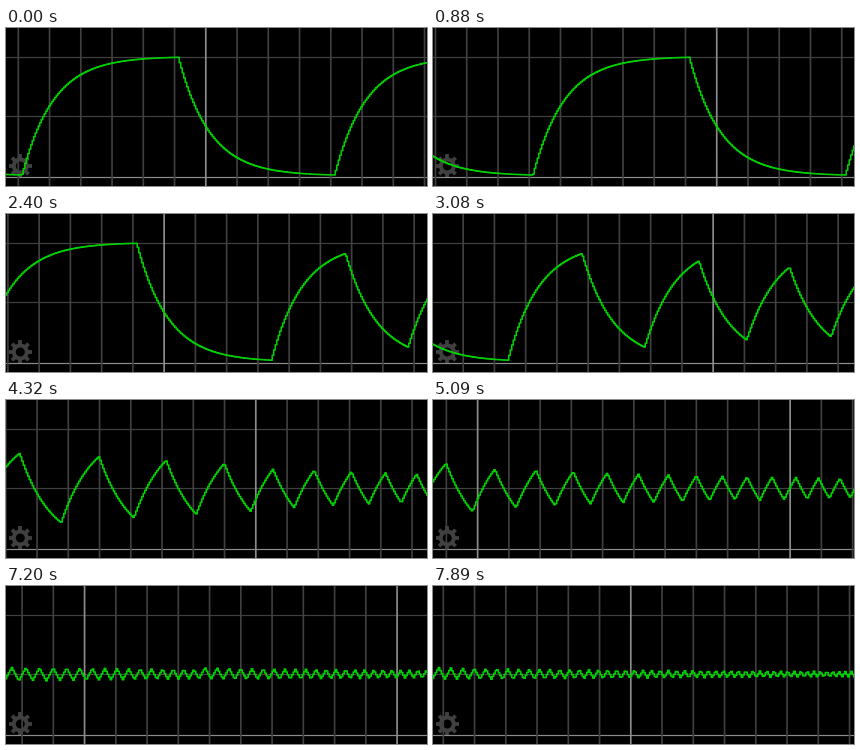
These frames come from a looping animation (421 px wide and 158 px high, 7950 ms). A matplotlib script:

```python
import numpy as np
import matplotlib.pyplot as plt
from matplotlib.animation import FuncAnimation
from matplotlib.collections import LineCollection

W, H, DPI = 421, 158, 100
PX = 72 / DPI                      # one pixel in points
LOOP, TICK = 7950, 15              # ms
STEP, STEPS = 68.4, 116            # the scope refreshes every STEP ms

DIV = 31.25                        # grid division, also the RC time constant
V_HIGH, V_LOW = 28.0, 147.3        # screen rows of the two input levels
DIM, BRIGHT, GREEN = "#404040", "#8c8c8c", "#00d000"


def scroll(step):
    """Near-constant speed with a slight lag past the middle."""
    return np.interp(step, [0, 63, 86, 115], [0.7, 1200.7, 1629.7, 2190.2])


def input_edges():
    """Flips of the square wave: steady at first, then a logarithmic sweep."""
    steady = 17 + 5 * DIV * np.arange(-1, 6)
    key_n = np.array([0, 5, 12, 21, 29, 41, 63, 90, 200])
    key_x = [933, 1214.5, 1445.5, 1611.5, 1720, 1853, 2030.5, 2190, 2641]
    n = np.arange(key_n[-1] + 1)
    sweep = np.interp(np.log(n + 5), np.log(key_n + 5), key_x)
    return np.concatenate([steady, sweep])


def edge_levels(edges):
    """Capacitor level (0..1) at every flip; odd flips go high."""
    levels = [1.0]
    for i, gap in enumerate(np.diff(edges)):
        goal = i % 2
        levels.append(goal + (levels[-1] - goal) * np.exp(-gap / DIV))
    return np.array(levels)


EDGES = input_edges()
LEVELS = edge_levels(EDGES)


def trace_y(x):
    i = np.searchsorted(EDGES, x, side="right") - 1
    goal = i % 2
    level = goal + (LEVELS[i] - goal) * np.exp(-(x - EDGES[i]) / DIV)
    return V_LOW + (V_HIGH - V_LOW) * level


def vertical(xs):
    return [[(x, 0), (x, H)] for x in xs]


def grid_lines(color, z):
    lines = LineCollection([], colors=color, linewidths=1.7 * PX,
                           snap=False, zorder=z)
    return ax.add_collection(lines)


fig = plt.figure(figsize=(W / DPI, H / DPI), dpi=DPI, facecolor="black")
ax = fig.add_axes([0, 0, 1, 1])
ax.set_xlim(0, W)
ax.set_ylim(H, 0)
ax.axis("off")

# Settings wheel
gx, gy = 14.3, 138
ax.add_patch(plt.Circle((gx, gy), 6.5, fill=False, ec=DIM, lw=4 * PX))
for a in np.arange(8) * np.pi / 4:
    r = np.array([7, 11.7])
    ax.plot(gx + r * np.cos(a), gy + r * np.sin(a), color=DIM,
            lw=3.8 * PX, solid_capstyle="butt", zorder=1)

# Grid
for y, color in ((28.5, DIM), (87.5, DIM), (148.5, BRIGHT)):
    ax.plot([0, W], [y, y], color=color, lw=1.2 * PX, zorder=2)
minor = grid_lines(DIM, 2)
major = grid_lines(BRIGHT, 3)

cols = np.arange(-1.5, W + 3, 1.5)
trace, = ax.plot([], [], color=GREEN, lw=1.6 * PX, snap=False,
                 drawstyle="steps-mid", zorder=4)


def update(i):
    step = min(int((i * TICK + 10) / STEP), STEPS - 1)
    offset = scroll(step)

    n = int((offset - 200) // DIV) + np.arange(16)
    xs = 200.5 + n * DIV - offset
    minor.set_segments(vertical(xs[n % 10 != 0]))
    major.set_segments(vertical(xs[n % 10 == 0]))

    trace.set_data(cols, trace_y(cols + offset) + 0.5)
    return minor, major, trace


anim = FuncAnimation(fig, update, frames=LOOP // TICK, interval=TICK,
                     repeat=True, repeat_delay=0, blit=False)
plt.show()
```
